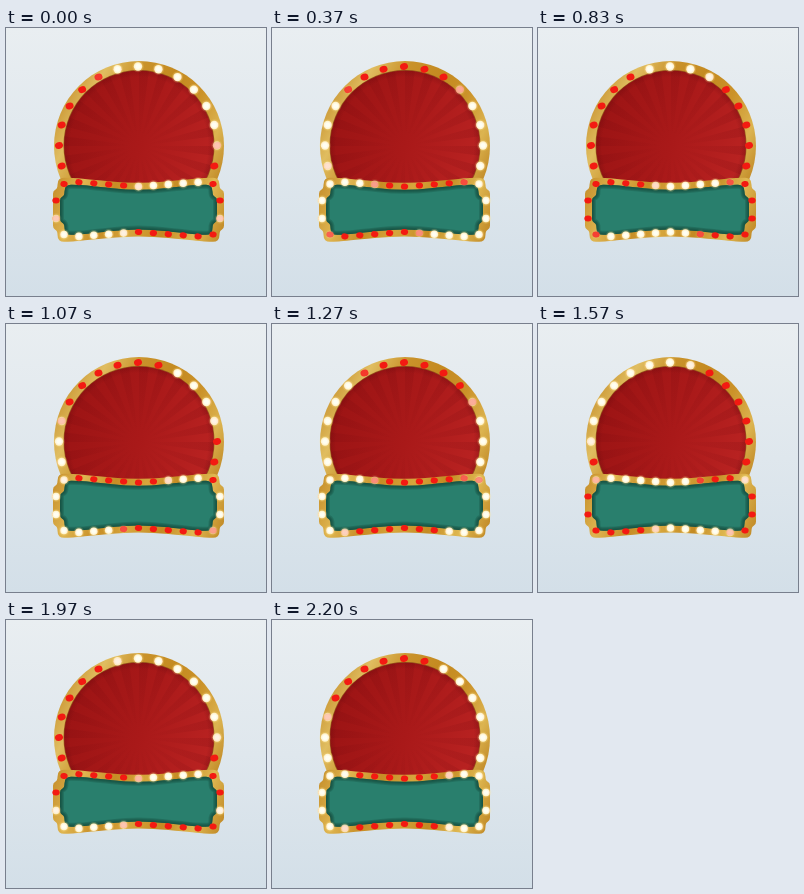
These frames come from a looping animation (260x268 px, 2.23 s). An HTML page with a canvas:

```html
<!DOCTYPE html>
<html lang="en">
<head>
<meta charset="utf-8">
<title>Marquee lights</title>
<style>
html, body { margin: 0; width: 100%; height: 100%; overflow: hidden; background: #dfe7ec; }
canvas { display: block; width: 260px; height: 268px; }
</style>
</head>
<body>
<canvas id="stage" width="260" height="268"></canvas>
<script>
const W = 260, H = 268, LOOP = 2230;
const CYCLE = 1950, STEP = 80, LIT = 510, FADE = 75;
const ARCH = { x: 133, y: 118 };
const BANNER = { x: 132.5, y: 181.7 };
const ctx = document.getElementById('stage').getContext('2d');

function gradient(x0, y0, x1, y1, ...colors) {
  const g = ctx.createLinearGradient(x0, y0, x1, y1);
  colors.forEach((c, i) => g.addColorStop(i / (colors.length - 1), c));
  return g;
}

function radial(x, y, r0, r1, inner, outer) {
  const g = ctx.createRadialGradient(x, y, r0, x, y, r1);
  g.addColorStop(0, inner);
  g.addColorStop(1, outer);
  return g;
}

function disc(x, y, r, fill) {
  ctx.beginPath();
  ctx.arc(x, y, r, 0, Math.PI * 2);
  ctx.fillStyle = fill;
  ctx.fill();
}

// Each group carries two red waves per cycle, starting at the given times.
const WAVES = {
  arch: [-430, 392],
  top: [-375, 530],
  bottom: [-450, 565],
  side: [-440, 500]
};
const bulbs = [];
function addBulb(x, y, size, tilt, index, group) {
  bulbs.push({ x, y, size, tilt, starts: WAVES[group].map(s => s + index * STEP) });
}

for (let i = 0; i < 15; i++) {
  const a = Math.PI * (195 - 15 * i) / 180;
  addBulb(132 + 79 * Math.cos(a), 117.5 - 79 * Math.sin(a), 4.2, -0.3, i, 'arch');
}
addBulb(207, 156, 3.8, -0.2, 15, 'arch');
for (let i = 0; i < 11; i++) {
  const d = Math.abs(i - 5), end = d === 5;
  const x = 58 + 14.9 * i;
  if (i < 10) addBulb(x, end ? 156 : 158.6 - 1.1 * d, 3.8, 0.2, i, 'top');
  addBulb(x, end ? 206.5 : 204 + 1.1 * d, 3.8, 0.2, 10 - i, 'bottom');
}
for (const x of [50, 214]) {
  addBulb(x, 172.5, 3.8, 0, 0, 'side');
  addBulb(x, 190.5, 3.8, 0, -1, 'side');
}

const clamp = v => Math.max(0, Math.min(1, v));

function redness(starts, t) {
  return Math.max(...starts.map(s => {
    const age = ((t - s + FADE / 2) % CYCLE + CYCLE) % CYCLE;
    return Math.min(clamp(age / FADE), clamp((LIT + FADE - age) / FADE));
  }));
}

// Closed curve through the midpoints of its control polygon.
function smoothPath(points) {
  const mid = (p, q) => [(p[0] + q[0]) / 2, (p[1] + q[1]) / 2];
  ctx.beginPath();
  ctx.moveTo(...mid(points[points.length - 1], points[0]));
  points.forEach((p, i) => {
    ctx.quadraticCurveTo(...p, ...mid(p, points[(i + 1) % points.length]));
  });
  ctx.closePath();
}

function bannerPath(inset) {
  const w = 85.5 - inset, h = 32 - inset;
  const corner = [[w, h - 19], [w, h - 13], [w - 4.5, h - 11], [w - 4.5, h - 3],
    [w - 8, h], [w - 14, h], [w - 26, h - 0.6]];
  const place = (sx, sy) => ([x, y]) => [BANNER.x + sx * x, BANNER.y + sy * y];
  const back = [...corner].reverse();
  const dip = [0, h - 6.6];
  smoothPath([
    ...[...corner, dip].map(place(1, 1)), ...back.map(place(-1, 1)),
    ...[...corner, dip].map(place(-1, -1)), ...back.map(place(1, -1))
  ]);
}

function drawBackground() {
  ctx.fillStyle = gradient(0, 0, 0, H, '#e9eef1', '#dfe7ed', '#d3dfe8');
  ctx.fillRect(0, 0, W, H);
}

function drawArch() {
  const { x, y } = ARCH;
  disc(x, y, 85, gradient(48, 70, 218, 160,
    '#c48c28', '#e0bd60', '#c9922a', '#c48a20', '#cb9229', '#dcb450', '#b97d1b'));
  disc(x, y - 0.5, 75.5, '#94521b');
  ctx.save();
  ctx.beginPath();
  ctx.arc(x, y - 0.5, 74.8, 0, Math.PI * 2);
  ctx.clip();
  ctx.fillStyle = gradient(58, 95, 208, 140, '#9c1414', '#a91919', '#ba2322');
  ctx.fillRect(50, 40, 165, 130);
  ctx.fillStyle = radial(x, y, 8, 75, 'rgba(120,10,15,0)', 'rgba(120,10,15,.2)');
  const rays = 24, sector = Math.PI * 2 / rays;
  for (let i = 0; i < rays; i++) {
    ctx.beginPath();
    ctx.moveTo(x, y);
    ctx.arc(x, y, 80, i * sector, (i + 0.5) * sector);
    ctx.fill();
  }
  ctx.fillStyle = radial(x, y, 69, 76, 'rgba(100,8,12,0)', 'rgba(100,8,12,.3)');
  ctx.fillRect(50, 40, 165, 130);
  ctx.restore();
}

function drawBanner() {
  bannerPath(0);
  ctx.fillStyle = gradient(47, 150, 218, 214,
    '#c48c28', '#dfb550', '#c78d25', '#d6a53c', '#c48a22', '#dfb852', '#bd8320');
  ctx.fill();

  bannerPath(7);
  ctx.fillStyle = '#297f6d';
  ctx.fill();
  ctx.save();
  ctx.clip();
  ctx.strokeStyle = 'rgba(17,60,48,.22)';
  for (const width of [2, 4, 6, 8]) {
    ctx.lineWidth = width;
    ctx.stroke();
  }
  ctx.restore();
}

function drawBulb({ x, y, size, tilt, starts }, t) {
  const red = redness(starts, t);
  ctx.beginPath();
  ctx.ellipse(x, y, size * 0.96, size * 0.8, tilt, 0, Math.PI * 2);
  ctx.fillStyle = '#f31a12';
  ctx.fill();
  ctx.globalAlpha = 1 - red;
  disc(x, y, size + 2, radial(x, y, size * 0.7, size + 2,
    'rgba(255,232,160,.6)', 'rgba(255,225,130,0)'));
  disc(x, y, size, radial(x, y, size * 0.45, size, '#fffef2', '#fff1c4'));
  ctx.globalAlpha = 1;
}

function draw(now) {
  const t = now % LOOP;
  drawBackground();
  drawArch();
  drawBanner();
  bulbs.forEach(b => drawBulb(b, t));
}

const start = performance.now();
function tick() {
  draw(performance.now() - start);
  requestAnimationFrame(tick);
}
tick();
</script>
</body>
</html>
```
